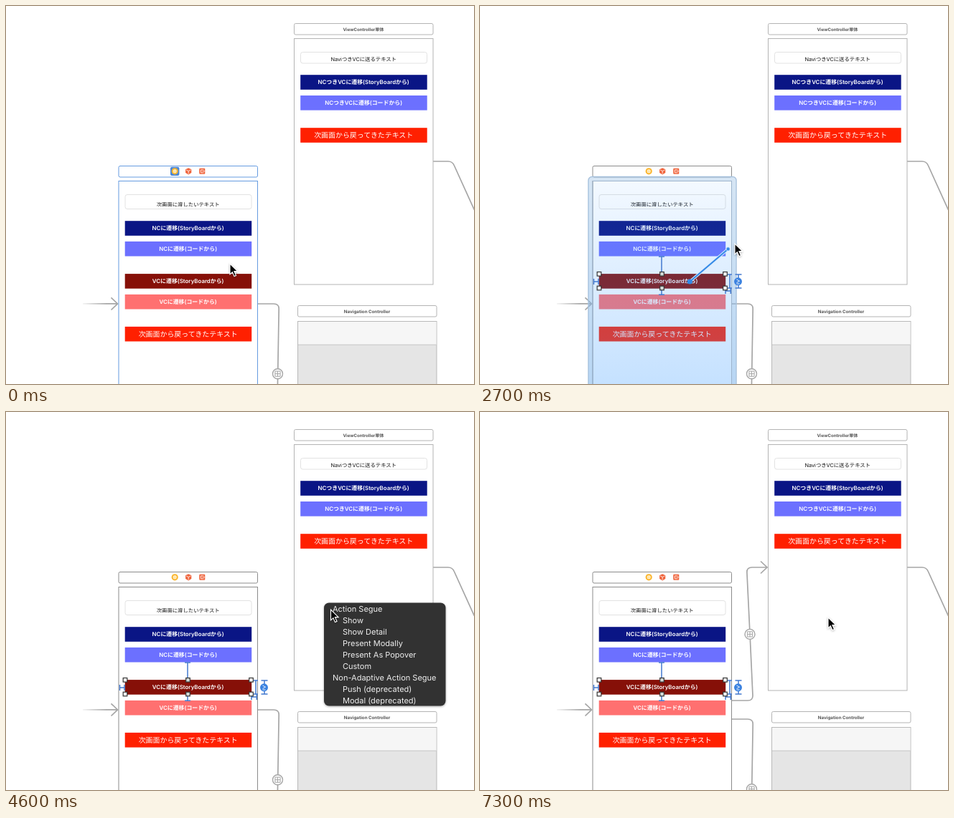
An HTML page for the animation above (7400 ms loop, 652 px wide and 528 px high).

```html
<!DOCTYPE html>
<html lang="ja">
<head>
<meta charset="utf-8">
<style>
html, body { margin: 0; width: 100%; height: 100%; overflow: hidden; background: #fff; }
svg { display: block; width: 652px; height: 528px; font-family: Inter, "Noto Sans CJK JP", "Noto Sans CJK", sans-serif; text-rendering: geometricPrecision; }
.wire { fill: none; stroke: #a6a6a6; stroke-width: 1.7; }
.pin { fill: none; stroke: #4379cf; stroke-width: 1.5; }
</style>
</head>
<body>
<svg id="stage" viewBox="0 0 652 528"></svg>
<script>
const LOOP = 7400, STEP = 100;
const stage = document.getElementById('stage');

const rect = (x, y, w, h, attrs) => `<rect x="${x}" y="${y}" width="${w}" height="${h}" ${attrs}/>`;
const path = (d, attrs) => `<path d="${d}" ${attrs}/>`;
const group = (id, body, attrs = '') => `<g id="${id}" ${attrs}>${body}</g>`;
const label = (text, x, cy, size, fill, weight = 400, anchor = 'middle') =>
  `<text x="${x}" y="${cy + size * 0.36}" font-size="${size}" fill="${fill}" font-weight="${weight}" text-anchor="${anchor}">${text}</text>`;

// A storyboard screen: title bar, body, text field and coloured buttons.
function screen({ id, x, y, stroke, title, field, fieldHeight, fieldText, clip, buttons }) {
  const cx = x + 96.7;
  const frame = rect(x, y - 21, 193.5, 15.5, 'rx="2"') + rect(x, y, 193.5, 343.5, '');
  return group(id, frame, `fill="#fff" stroke="${stroke}"`) + title +
    rect(x + 9, y + 19, 176, fieldHeight, 'rx="3" fill="#fff" stroke="#e2e2e2"') +
    `<clipPath id="${id}Clip">${rect(x, y, 194, clip, '')}</clipPath>` +
    `<g clip-path="url(#${id}Clip)">${label(fieldText, cx, y + field, 7.35, '#111')}</g>` +
    buttons.map(([dy, color, text, size = 7.9, weight = 600]) =>
      rect(x + 8.7, y + dy, 176.5, 20.6, `fill="${color}"`) +
      label(text, cx, y + dy + 10.2, size, '#fff', weight)).join('');
}

const NAVY = '#0a1585', VIOLET = '#6c70ff', MAROON = '#861008', PINK = '#ff7070', RED = '#ff2000';
const returned = dy => [dy, RED, '次画面から戻ってきたテキスト', 9.95, 500];

const icons =
  rect(229, 224.7, 12.4, 12.4, 'id="iconBack" rx="2" fill="#4a87d8"') +
  '<circle cx="235.2" cy="230.8" r="4.6" fill="#fbb52c"/>' +
  rect(233.2, 228.8, 4, 4, 'rx="1" fill="#ffe3a2" stroke="#fff" stroke-width=".7"') +
  path('M254.2 226.3l4.1 2v4.8l-4.1 2.3-4.1-2.3v-4.8z', 'fill="#f0643c"') +
  path('M251 229l3.2 1.5 3.2-1.5M254.2 230.5v4', 'fill="none" stroke="#fff" stroke-width=".8"') +
  rect(269.3, 226.8, 8, 8, 'rx="1" fill="#f0643c"') +
  path('M275.5 228.8h-4v4h4M273.5 230.8h3.5', 'fill="none" stroke="#fff" stroke-width=".8"');

const leftScreen = screen({
  id: 'left', x: 157, y: 244.5, stroke: '#8c8c8c', title: icons,
  field: 33.2, fieldHeight: 20, fieldText: '次画面に渡したいテキスト', clip: 35.5,
  buttons: [
    [55.7, NAVY, 'NCに遷移(StoryBoardから)'],
    [84.4, VIOLET, 'NCに遷移(コードから)'],
    [129.6, MAROON, 'VCに遷移(StoryBoardから)'],
    [158.4, PINK, 'VCに遷移(コードから)'],
    returned(203.4)
  ]
});

const rightScreen = screen({
  id: 'right', x: 401.5, y: 45.5, stroke: '#b4b4b4', title: label('ViewController単体', 498, 32.6, 6.1, '#555', 700),
  field: 28.5, fieldHeight: 15.5, fieldText: 'NaviつきVCに送るテキスト', clip: 33.8,
  buttons: [
    [50.7, NAVY, 'NCつきVCに遷移(StoryBoardから)'],
    [79.5, VIOLET, 'NCつきVCに遷移(コードから)'],
    returned(124.7)
  ]
});

const navigation =
  rect(406.5, 418.5, 193.5, 15.5, 'rx="2" fill="#fff" stroke="#b4b4b4"') +
  label('Navigation Controller', 503, 426.6, 6.2, '#555', 700) +
  rect(406.5, 440.5, 193.5, 100, 'fill="#e5e5e5" stroke="#b9b9b9"') +
  rect(407, 441, 192.5, 32, 'fill="#f6f6f6"') +
  path('M407 473.2h192.5', 'stroke="#c6c6c6"');

const segueBadge = (x, y) =>
  `<circle cx="${x}" cy="${y}" r="7" fill="#fff" stroke="#a6a6a6" stroke-width="1.4"/>` +
  path(`M${x - 3.6} ${y - 3.6}h7.2v7.2h-7.2zM${x} ${y - 3.6}v7.2M${x - 3.6} ${y}h7.2`, 'fill="none" stroke="#a6a6a6"');

const wires =
  path('M107 415.9h48', 'stroke="url(#fadeIn)" stroke-width="1.7"') +
  path('M146.5 407.3l9 8.6-9 8.6', 'class="wire"') +
  path('M595 217h21q6 0 8.5 6l28 62', 'class="wire"') +
  group('lowerSegue', path('M351 416h22q7.300 0 7.200 7l-2 120', 'class="wire"') + segueBadge(378.5, 513.7)) +
  group('newSegue',
    path('M351 403h22q7.200 0 7-7l-3.600-78-4.500-94q-.3-7 7-7h21M391 208.500l9 8.500-9 8.500', 'class="wire"') +
    segueBadge(376, 310.4));

// Translucent blue drop-target highlight around a screen.
const dropTarget = (id, x, y) => group(id,
  rect(x - 6, y - 6, 206, 355.5, 'rx="5" fill="url(#drop)" stroke="#a9c3de" stroke-width="1.5"') +
  rect(x - 3, y - 3, 199.5, 349.5, 'rx="2" fill="none" stroke="#9fc0e0" stroke-opacity=".35" stroke-width="5"') +
  rect(x, y, 193.5, 343.5, 'fill="none" stroke="#9db4cc"'));

const handles = [166, 253.5, 341.5].flatMap((x, i) => [374.3, 394].map(y =>
  rect(x - 2.8, y - 2.8, 5.6, 5.6, `fill="${i === 1 ? '#d4dbd8' : '#fff'}" stroke="#333" stroke-width="1.2"`))).join('');
const selection = group('selection',
  path('M253 350v23M249 350h8M253 397v6M249 403.300h8M158.500 385h6.500M158.500 381v8M165 381v8' +
    'M342 398h7M342 394v8M349.300 394v8M348 375v19M345 375h6M345 394h6M360 375v19M355.500 375h9M355.500 394h9', 'class="pin"') +
  '<circle cx="359.5" cy="384.8" r="5.5" fill="#3b82e0"/>' +
  path('M357.500 382l4 2.200-4 2.200M357.500 388h4', 'fill="none" stroke="#fff" stroke-width=".9"') +
  handles);

const dragLine = group('drag',
  path('', 'class="rope" stroke="#d8ebff" stroke-width="4"') +
  path('', 'class="rope" stroke="#3289e6" stroke-width="2"') +
  '<circle cx="292.3" cy="385" r="3.6" fill="#3289e6"/>' +
  '<circle id="dragEnd" r="2.6" fill="#3289e6" stroke="#d8ebff" stroke-width=".8"/>');

const tooltip = group('tooltip',
  rect(544.5, 384.5, 116, 20.5, 'rx="4" fill="#454545" stroke="#8f8f8f" stroke-width="1.6" filter="url(#shadow)"') +
  label('ViewController単体', 548.5, 394.7, 10.9, '#fff', 700, 'start'));

const menuItems = [
  'Action Segue', ' Show', ' Show Detail', ' Present Modally', ' Present As Popover', ' Custom',
  'Non-Adaptive Action Segue', ' Push (deprecated)', ' Modal (deprecated)'
];
const menu = group('menu',
  rect(443, 266.5, 169.5, 144, 'rx="7" fill="#323232" filter="url(#shadow)"') +
  rect(443, 283, 169.5, 16, 'id="menuRow" fill="#141414"') +
  menuItems.map((item, i) =>
    label(item.trim(), item[0] === ' ' ? 469 : 455, 275 + i * 16, 11, '#eee', 400, 'start')).join(''));

const arrow = group('arrow',
  path('M0 0v14.800l3.400-3.200 2.600 6 2.500-1.100-2.600-5.900h4.700z', 'stroke="#fff" stroke-width="1.1" filter="url(#shadow)"'));
const fingers = 'M-3.800 1.500L-5-4.200M-1.300 0V-6M1.300 0L1.800-5.800M3.600 1.500L5-3.800M-4 3.500L-6.300.500M-2 3h4';
const hand = group('hand',
  path(fingers, 'stroke="#111" stroke-width="4" stroke-linecap="round"') +
  path('M-5 0h9.500l-.8 5-1.700 3.500h-4z', 'fill="#fff" stroke="#111"') +
  path(fingers, 'stroke="#fff" stroke-width="2.2" stroke-linecap="round"'),
  'transform="translate(292 385.500)"');

stage.innerHTML = `<defs>
  <linearGradient id="fadeIn" gradientUnits="userSpaceOnUse" x1="106" y1="0" x2="140" y2="0">
    <stop stop-color="#a6a6a6" stop-opacity=".1"/><stop offset="1" stop-color="#a6a6a6"/></linearGradient>
  <linearGradient id="drop" x2="0" y2="1">
    <stop stop-color="#46a0ff" stop-opacity=".06"/><stop offset="1" stop-color="#46a0ff" stop-opacity=".37"/></linearGradient>
  <filter id="shadow" x="-20%" y="-20%" width="140%" height="150%">
    <feDropShadow dx="0" dy="1" stdDeviation="1.5" flood-opacity=".35"/></filter>
  </defs>` + wires + leftScreen + rightScreen + navigation +
  dropTarget('leftDrop', 157, 244.5) + dropTarget('rightDrop', 401.5, 45.5) +
  selection + dragLine + tooltip + menu + arrow + hand;

// Pointer route: [ms, x, y]
const route = [
  [0, 312, 360], [300, 303, 370], [700, 292, 383], [2200, 292, 384], [2500, 318, 364], [2700, 355, 332],
  [2900, 422, 289], [3200, 445, 273], [4100, 445, 273], [4600, 452.5, 276], [5100, 485, 287], [LOOP, 485, 287]
];
function pointerAt(t) {
  const i = route.findIndex(point => point[0] > t);
  const [t0, x0, y0] = route[i - 1], [t1, x1, y1] = route[i];
  const k = (t - t0) / (t1 - t0);
  return [x0 + (x1 - x0) * k, y0 + (y1 - y0) * k];
}

const el = id => document.getElementById(id);
const show = (id, visible) => el(id).setAttribute('display', visible ? 'inline' : 'none');
const ropes = document.querySelectorAll('.rope');

function draw(now) {
  const t = Math.floor((now % LOOP) / STEP) * STEP;
  const during = (from, to) => t >= from && t < to;
  const selected = t >= 1500, connected = t >= 6300;

  el('left').setAttribute('stroke', selected ? '#8c8c8c' : '#659be0');
  show('iconBack', !selected);
  show('selection', selected);
  show('leftDrop', during(2300, 2800));
  show('rightDrop', during(2800, 4000));
  show('tooltip', during(2900, 4000));
  show('newSegue', connected);
  el('lowerSegue').setAttribute('transform', `translate(0 ${connected ? 13 : 0})`);

  show('drag', during(2200, 4000));
  const [endX, endY] = pointerAt(Math.max(0, t - 40));
  const end = { x: endX - 2, y: endY + 1 };
  ropes.forEach(rope => rope.setAttribute('d', `M292.3 385L${end.x} ${end.y}`));
  el('dragEnd').setAttribute('cx', end.x);
  el('dragEnd').setAttribute('cy', end.y);

  show('menu', during(4100, 6200));
  show('menuRow', t >= 5000);
  el('menu').setAttribute('opacity', Math.max(0, Math.min(1, (6115 - t) / 200)));

  const grabbing = during(1500, 2200);
  show('hand', grabbing);
  show('arrow', !grabbing);
  el('arrow').setAttribute('transform', `translate(${pointerAt(t).join(' ')})`);
}

function tick() {
  draw(performance.now());
  requestAnimationFrame(tick);
}
tick();
</script>
</body>
</html>
```
